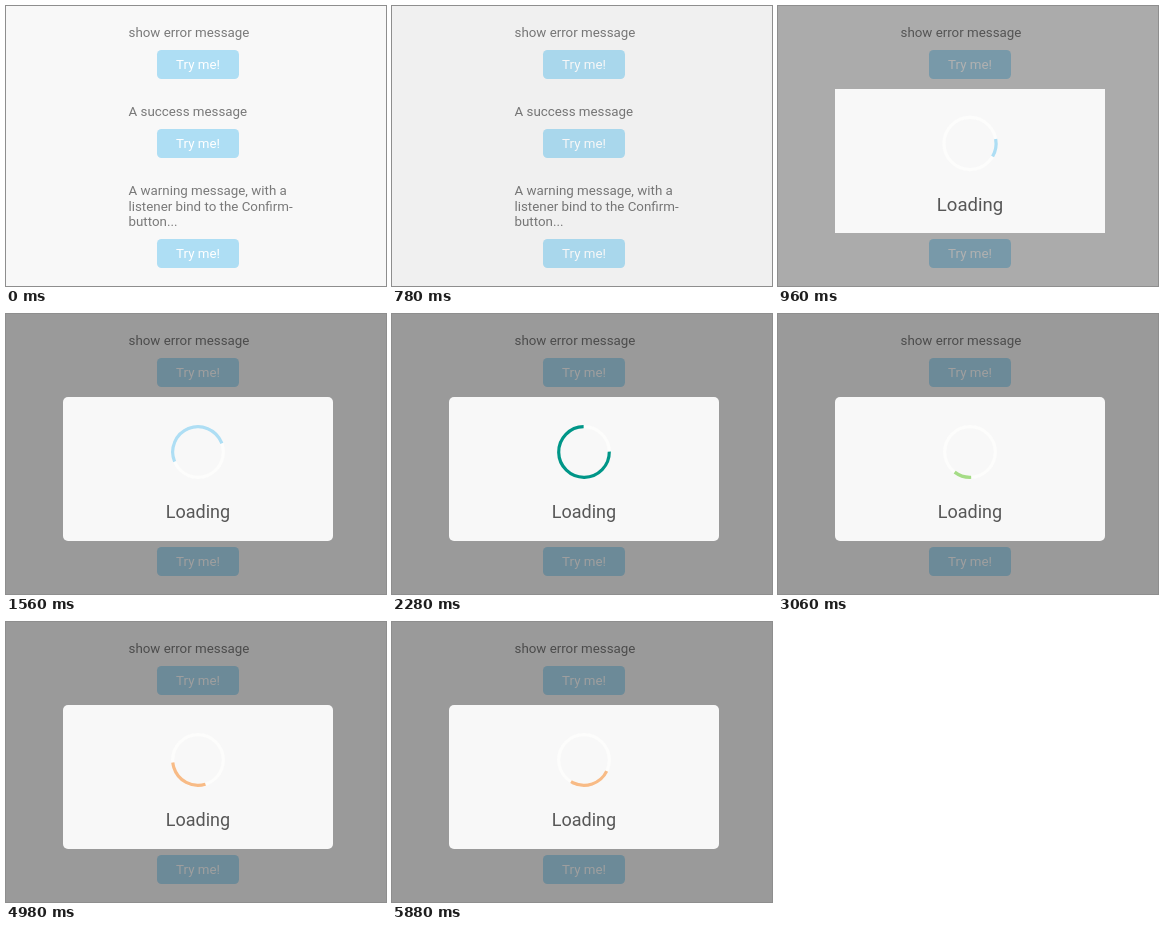
These frames come from a looping animation (380 by 280 pixels, 5.94 s). An HTML page with a canvas:

```html
<!DOCTYPE html>
<html lang="en">
<head>
<meta charset="utf-8">
<title>Loading dialog</title>
<style>
  html, body { margin: 0; width: 100%; height: 100%; overflow: hidden; background: #f8f8f8; }
  canvas { display: block; width: 380px; height: 280px; }
</style>
</head>
<body>
<canvas id="stage"></canvas>
<script>
const W = 380, H = 280, LOOP = 5940, STEP = 60, OPEN = 780;
const canvas = document.getElementById('stage');
const ctx = canvas.getContext('2d');
const ratio = window.devicePixelRatio || 1;
canvas.width = W * ratio;
canvas.height = H * ratio;

const PAPER = '#f8f8f8', BLUE = '#aedef4';
const FONT = 'Roboto, "Open Sans", sans-serif';

// Opening steps: dim, dialog opacity, dialog scale
const INTRO = [
  [0.03, 0, 0.7], [0.07, 0, 0.7], [0.133, 0.2, 0.7],
  [0.31, 1, 1.03], [0.38, 1, 1], [0.38, 1, 0.96]
];
const SETTLED = [0.38, 1, 1];

const TICK_START = 840, TICK = 772;
const BAR_COLORS = [BLUE, '#009688', '#a5dc86', '#80cbc4', '#37474f', '#f8bb86'];

// Spinner, in seconds and degrees
const SPIN = 270, BAR = 40, STRETCH = 230;
const FIRST = 0.514, PHASE = 1.163, GROW = 0.7;

const ease = x => (1 - Math.cos(Math.PI * Math.min(1, x))) / 2;
const rad = deg => deg * Math.PI / 180;

function text(str, x, y, size, color, align = 'left') {
  ctx.font = `${size}px ${FONT}`;
  ctx.fillStyle = color;
  ctx.textAlign = align;
  ctx.fillText(str, x, y);
}

function box(x, y, w, h, r, color) {
  ctx.fillStyle = color;
  ctx.beginPath();
  ctx.roundRect(x, y, w, h, r);
  ctx.fill();
}

function button(y) {
  box(151, y, 82, 29, 4.5, BLUE);
  text('Try me!', 192, y + 19.3, 13.33, '#fff', 'center');
}

function page() {
  ctx.fillStyle = PAPER;
  ctx.fillRect(0, 0, W, H);
  const lines = [
    ['show error message', 31], ['A success message', 110],
    ['A warning message, with a', 189],
    ['listener bind to the Confirm-', 204.6], ['button...', 220]
  ];
  for (const [str, y] of lines) text(str, 122.5, y, 13.33, '#797979');
  [44, 123, 233].forEach(button);
}

// The bar grows at its head, rests, then shrinks from its tail.
function barAt(t) {
  const u = t - FIRST;
  let extra = 0, tail = 0;
  if (u > 0) {
    const n = Math.floor(u / PHASE);
    const e = ease((u - n * PHASE) / GROW);
    const shrinking = n % 2;
    extra = STRETCH * (shrinking ? 1 - e : e);
    tail = STRETCH * (Math.floor(n / 2) + (shrinking ? e : 0));
  }
  return { from: SPIN * t - 90 + tail, length: BAR + extra };
}

function arc(from, length, color) {
  ctx.strokeStyle = color;
  ctx.lineWidth = 3.2;
  ctx.beginPath();
  ctx.arc(192, 138, 25.3, rad(from), rad(from + length));
  ctx.stroke();
}

function spinner(ms) {
  const { from, length } = barAt(0.296 + (ms - 960) * 0.001036);
  const tick = Math.floor((ms - TICK_START) / TICK);
  arc(0, 360, '#fdfdfc');
  arc(from, length, BAR_COLORS[Math.max(0, Math.min(tick, BAR_COLORS.length - 1))]);
}

function dialog(ms, alpha, scale) {
  ctx.save();
  ctx.beginPath();
  ctx.rect(57, 83, 270, 144);
  ctx.clip();
  ctx.globalAlpha = alpha;
  ctx.translate(192, 155);
  ctx.scale(scale, scale);
  ctx.translate(-192, -155);
  box(57, 83, 270, 144, 5, PAPER);
  spinner(ms);
  text('Loading', 192, 203.7, 18, '#575757', 'center');
  ctx.restore();
}

function draw(ms) {
  ctx.setTransform(ratio, 0, 0, ratio, 0, 0);
  page();
  if (ms < OPEN) return;
  const [dim, alpha, scale] = INTRO[(ms - OPEN) / STEP] || SETTLED;
  ctx.fillStyle = `rgba(0, 0, 0, ${dim})`;
  ctx.fillRect(0, 0, W, H);
  if (alpha > 0) dialog(ms, alpha, scale);
}

const start = performance.now();
function frame() {
  const ms = (performance.now() - start) % LOOP;
  draw(Math.floor(ms / STEP) * STEP);
  requestAnimationFrame(frame);
}
frame();
</script>
</body>
</html>
```
